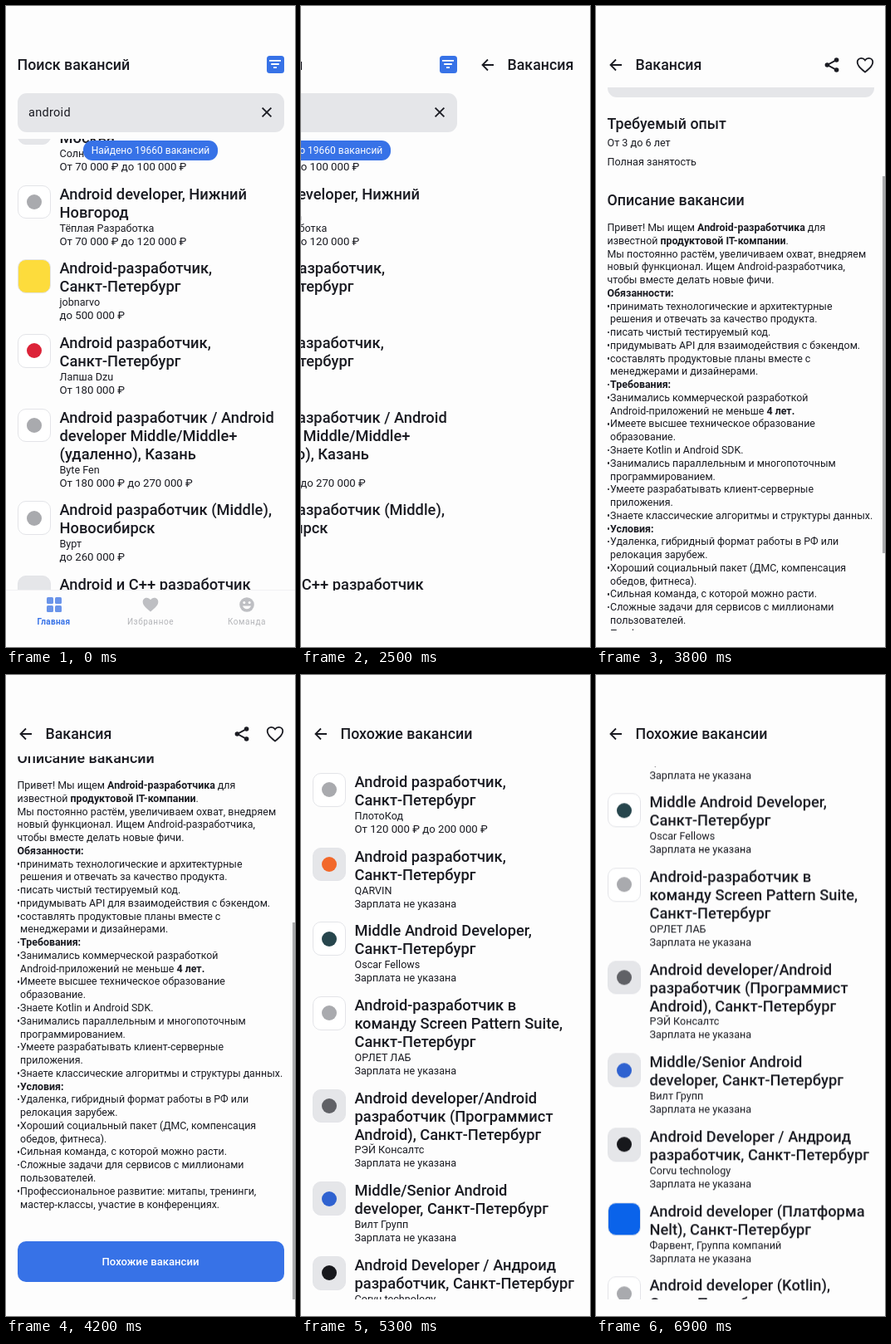
An HTML page that plays this animation: 348 by 772 pixels, repeating every 8000 ms.

```html
<!DOCTYPE html>
<html lang="ru">
<head>
<meta charset="utf-8">
<title>Поиск вакансий</title>
<style>
  html, body { margin: 0; width: 100%; height: 100%; overflow: hidden; background: #fdfdfd; }
  body { font: 12.6px/16px Roboto, "Noto Sans", sans-serif; color: #1a1b22; }
  #stage { position: relative; width: 348px; height: 772px; overflow: hidden; }
  #strip { position: absolute; width: 1044px; height: 772px; }
  .page { position: absolute; top: 0; width: 348px; height: 772px; background: #fdfdfd; }
  .text { position: absolute; line-height: 20px; white-space: nowrap; }
  .mid { transform: translateX(-50%); }
  .head { font-size: 17.8px; font-weight: 500; }
  .big { font-size: 31px; font-weight: 500; }
  .pay { font-size: 21px; font-weight: 500; }
  .query { font-size: 14.5px; letter-spacing: .3px; }
  .tab { font-size: 10px; letter-spacing: .55px; color: #b4b5b9; }
  .tab.on { font-weight: 700; letter-spacing: .3px; color: #3772e7; }
  .clip { position: absolute; left: 0; width: 348px; overflow: hidden; }
  .scroll { position: absolute; left: 0; top: 0; width: 348px; }
  .box { position: absolute; }
  svg { position: absolute; overflow: visible; }
  .item { position: relative; margin-bottom: 13.9px; padding-left: 64.5px; white-space: nowrap; }
  .item b { display: block; font: 500 18.3px/21.9px Roboto, "Noto Sans", sans-serif; }
  .item span { display: block; }
  .item .sum { font-size: 13.2px; }
  .tile { position: absolute; left: 13.5px; top: 0; width: 40.5px; height: 40.5px;
          box-sizing: border-box; border: 1px solid #e3e4e8; border-radius: 10px; }
  .tile i { position: absolute; left: 50%; top: 50%; width: 18px; height: 18px; margin: -9px;
            border-radius: 50%; }
  .about { position: absolute; left: 13.5px; font-size: 12.4px; line-height: 15.77px;
           white-space: nowrap; }
  .about b { font-weight: 600; }
  .about .in { padding-left: 3.6px; }
  .about .dot { position: relative; }
  .about .dot::before { content: ""; position: absolute; left: 0; top: 6.5px; width: 2.6px;
                        height: 2.6px; border-radius: 50%; background: #1a1b22; }
</style>
</head>
<body>
<div id="stage"><div id="strip"></div></div>
<script>
const LOOP = 8000, BLUE = '#3772e7', INK = '#1a1b22', GRAY = '#e5e6e9';

const text = (x, y, kind, value, style = '') =>
  `<div class="text ${kind}" style="left:${x}px;top:${y - 10}px;${style}">${value}</div>`;

const box = (x, y, w, h, radius, color, id = '') =>
  `<div class="box" id="${id}" style="left:${x}px;top:${y}px;width:${w}px;height:${h}px;` +
  `border-radius:${radius}px;background:${color}"></div>`;

// Icons are drawn around their own centre.
const icon = (x, y, shapes, attrs = `fill="none" stroke="${INK}" stroke-width="1.8"`) =>
  `<svg width="1" height="1" style="left:${x}px;top:${y}px" ${attrs}>${shapes}</svg>`;

const clip = (id, top, bottom, start, content) =>
  `<div class="clip" style="top:${top}px;height:${bottom - top}px">` +
  `<div class="scroll" id="${id}" style="padding-top:${start}px">${content}</div></div>`;

const page = (n, content) => `<div class="page" style="left:${n * 348}px">${content}</div>`;

const HEART = '<path d="M0 8.6C-6.8 2.8-9.3.4-9.3-3.4-9.3-6.2-7-8.2-4.5-8.2-2.7-8.2-1-7.2 0-5.7' +
  ' 1-7.2 2.7-8.2 4.5-8.2 7-8.2 9.3-6.2 9.3-3.4 9.3.4 6.8 2.8 0 8.6z"/>';
const BACK = icon(24, 71, '<path d="M7 0H-6M0-6.5L-6.5 0 0 6.5"/>');
const SHARE = '<path d="M5.4-5.8L-5.4 0 5.4 5.8" fill="none" stroke-width="1.9"/>' +
  [[5.6, -6], [-5.6, 0], [5.6, 6]]
    .map(([x, y]) => `<circle cx="${x}" cy="${y}" r="2.8" stroke="none"/>`).join('');

// Tile: background and mark colour.
const TILES = {
  blank: ['#fff', '#a9aaae'],
  gray: [GRAY],
  yellow: ['#fddc3c'],
  red: ['#fff', '#dc2338'],
  orange: [GRAY, '#f2682a'],
  teal: ['#fff', '#27464d'],
  dark: [GRAY, '#606166'],
  azure: [GRAY, '#2f62d0'],
  black: [GRAY, '#17181c'],
  blue: ['#0a63ea'],
};
const tile = name => {
  const [back, mark] = TILES[name];
  return `<div class="tile" style="background:${back}">` +
    (mark ? `<i style="background:${mark}"></i>` : '') + '</div>';
};
const item = ([look, title, firm, sum]) =>
  `<div class="item">${tile(look)}<b>${title.replace(/\|/g, '<br>')}</b><span>${firm}</span>` +
  (sum ? `<span class="sum">${sum}</span>` : '<span>Зарплата не указана</span>') + '</div>';

const found = [
  ['gray', 'Android-разработчик,|Москва', 'Солнар', 'От 70 000 ₽ до 100 000 ₽'],
  ['blank', 'Android developer, Нижний|Новгород', 'Тёплая Разработка', 'От 70 000 ₽ до 120 000 ₽'],
  ['yellow', 'Android-разработчик,|Санкт-Петербург', 'jobnarvo', 'до 500 000 ₽'],
  ['red', 'Android разработчик,|Санкт-Петербург', 'Лапша Dzu', 'От 180 000 ₽'],
  ['blank', 'Android разработчик / Android|developer Middle/Middle+|(удаленно), Казань', 'Byte Fen',
    'От 180 000 ₽ до 270 000 ₽'],
  ['blank', 'Android разработчик (Middle),|Новосибирск', 'Вурт', 'до 260 000 ₽'],
  ['gray', 'Android и C++ разработчик', ''],
];
const similar = [
  ['blank', 'Android разработчик,|Санкт-Петербург', 'ПлотоКод', 'От 120 000 ₽ до 200 000 ₽'],
  ['orange', 'Android разработчик,|Санкт-Петербург', 'QARVIN'],
  ['teal', 'Middle Android Developer,|Санкт-Петербург', 'Oscar Fellows'],
  ['blank', 'Android-разработчик в|команду Screen Pattern Suite,|Санкт-Петербург', 'ОРЛЕТ ЛАБ'],
  ['dark', 'Android developer/Android|разработчик (Программист|Android), Санкт-Петербург', 'РЭЙ Консалтс'],
  ['azure', 'Middle/Senior Android|developer, Санкт-Петербург', 'Вилт Групп'],
  ['black', 'Android Developer / Андроид|разработчик, Санкт-Петербург', 'Corvu technology'],
  ['blue', 'Android developer (Платформа|Nelt), Санкт-Петербург', 'Фарвент, Группа компаний'],
  ['blank', 'Android developer (Kotlin),|Санкт-Петербург', 'Вурт'],
];

// "•" starts a bullet, ">" continues it, "*" wraps bold text.
const about = `Привет! Мы ищем *Android-разработчика* для
известной *продуктовой IT-компании*.
Мы постоянно растём, увеличиваем охват, внедряем
новый функционал. Ищем Android-разработчика,
чтобы вместе делать новые фичи.
*Обязанности:*
•принимать технологические и архитектурные
>решения и отвечать за качество продукта.
•писать чистый тестируемый код.
•придумывать API для взаимодействия с бэкендом.
•составлять продуктовые планы вместе с
>менеджерами и дизайнерами.
•*Требования:*
•Занимались коммерческой разработкой
>Android-приложений не меньше *4 лет.*
•Имеете высшее техническое образование
>образование.
•Знаете Kotlin и Android SDK.
•Занимались параллельным и многопоточным
>программированием.
•Умеете разрабатывать клиент-серверные
>приложения.
•Знаете классические алгоритмы и структуры данных.
•*Условия:*
•Удаленка, гибридный формат работы в РФ или
>релокация зарубеж.
•Хороший социальный пакет (ДМС, компенсация
>обедов, фитнеса).
•Сильная команда, с которой можно расти.
•Сложные задачи для сервисов с миллионами
>пользователей.
•Профессиональное развитие: митапы, тренинги,
>мастер-классы, участие в конференциях.`.split('\n').map(line => {
  const kind = { '•': 'in dot', '>': 'in' }[line[0]] || '';
  const words = line.replace(/^[•>]/, '').replace(/\*(.+?)\*/g, '<b>$1</b>');
  return `<div class="${kind}">${words}</div>`;
}).join('');

const nav = `<div id="nav">
  ${box(0, 703, 348, 1, 0, '#f1f1f3')}
  ${[[49, 712], [59, 712], [49, 722], [59, 722]].map(([x, y]) => box(x, y, 8, 8, 1.5, '#6a94ea')).join('')}
  ${icon(174, 721, HEART, 'fill="#bebfc3"')}
  ${icon(290, 721, '<circle r="8.8" fill="#bebfc3"/><circle cx="-3.2" cy="-2.4" r="1.5"/>' +
    '<circle cx="3.2" cy="-2.4" r="1.5"/><path d="M-5 1.5H5C3.6 6.4-3.6 6.4-5 1.5z"/>', 'fill="#fdfdfd"')}
  ${text(57.5, 741.5, 'tab on mid', 'Главная')}
  ${text(174, 741.5, 'tab mid', 'Избранное')}
  ${text(290, 741.5, 'tab mid', 'Команда')}
</div>`;

const searchPage = page(0,
  text(13.5, 71, 'head', 'Поиск вакансий') +
  box(313.5, 60, 21, 20.5, 3.5, BLUE) +
  icon(324, 70.2, '<path d="M-7-4.2H7M-4.8 0H4.8M-2 4.2H2"/>', 'stroke="#fff" stroke-width="1.8"') +
  box(13.5, 105, 321, 47, 11, GRAY) +
  text(27, 128.5, 'query', 'android') +
  icon(314, 128, '<path d="M-5.4-5.4L5.4 5.4M5.4-5.4L-5.4 5.4"/>') +
  clip('found', 160, 704, 0, `<div style="margin-top:-34px">${found.map(item).join('')}</div>`) +
  box(93, 162, 162, 24, 11, BLUE) +
  text(174, 174, 'mid', 'Найдено 19660 вакансий', 'font-size:12px;color:#fff') + nav);

// Positions inside the scrolled body are measured from the top of the stage.
const vacancyBody = `<div style="position:absolute;top:-98px;width:348px">
  ${text(13.5, 117, 'big', 'Android-разработчик')}
  ${text(13.5, 151, 'pay', 'до 500 000 ₽')}
  ${box(13.5, 187, 321, 77, 11, GRAY)}
  ${box(29, 202, 46, 46, 11, '#fddc3c')}
  ${text(83, 215, 'head', 'jobnarvo')}
  ${text(83, 237, '', 'Санкт-Петербург')}
  ${text(13.5, 296, 'head', 'Требуемый опыт')}
  ${text(13.5, 318.5, '', 'От 3 до 6 лет')}
  ${text(13.5, 342, '', 'Полная занятость')}
  ${text(13.5, 388, 'head', 'Описание вакансии')}
  <div class="about" style="top:413px">${about}</div>
  ${box(13.5, 969.5, 321, 49.5, 10, BLUE)}
  ${text(174, 994.5, 'mid', 'Похожие вакансии', 'font-size:13.1px;font-weight:500;color:#fff')}
</div>`;

const vacancyPage = page(1,
  BACK + text(47.5, 71, 'head', 'Вакансия') +
  icon(283.5, 70.5, SHARE, `fill="${INK}" stroke="${INK}"`) +
  icon(324, 70.5, HEART) +
  clip('vacancy', 98, 752, 0, vacancyBody) +
  box(344.5, 98, 3.5, 454, 0, '#a9aaac', 'thumb'));

const similarPage = page(2,
  BACK + text(47.5, 71, 'head', 'Похожие вакансии') +
  clip('similar', 110, 752, 8, similar.map(item).join('')));

const $ = id => document.getElementById(id);
$('strip').innerHTML = searchPage + vacancyPage + similarPage;

// Each track holds a value from its time until the next one.
const track = (id, steps, style) => {
  const frames = [...steps, [LOOP, steps[steps.length - 1][1]]].map(([time, value]) =>
    ({ offset: time / LOOP, easing: 'step-end', ...style(value) }));
  $(id).animate(frames, { duration: LOOP, iterations: Infinity });
};
const moveX = x => ({ transform: `translateX(${x}px)` });
const moveY = y => ({ transform: `translateY(${y}px)` });
const fade = opacity => ({ opacity });

track('strip', [[0, 0], [2500, -147], [2600, -278], [2700, -337], [2800, -348],
  [4800, -390], [4900, -553], [5000, -654], [5100, -691], [5200, -696]], moveX);
track('nav', [[0, 1], [2500, 0]], fade);

const reading = [[0, 0], [3800, 154], [3900, 245], [4000, 278], [4100, 286], [4200, 288]];
track('vacancy', reading, y => moveY(-y));
track('vacancy', [[0, 0], [2800, 1]], fade);
track('thumb', reading, y => moveY(y * 200 / 288));
track('thumb', [[0, 0], [3800, 1], [4500, .5], [4600, 0]], fade);

track('similar', [[0, 0], [6200, 54.7], [6300, 95], [6400, 120], [6500, 136], [6600, 146],
  [6700, 151.5], [6800, 154], [6900, 154.7]], y => moveY(-y));
track('similar', [[0, 0], [5300, 1]], fade);
</script>
</body>
</html>
```
